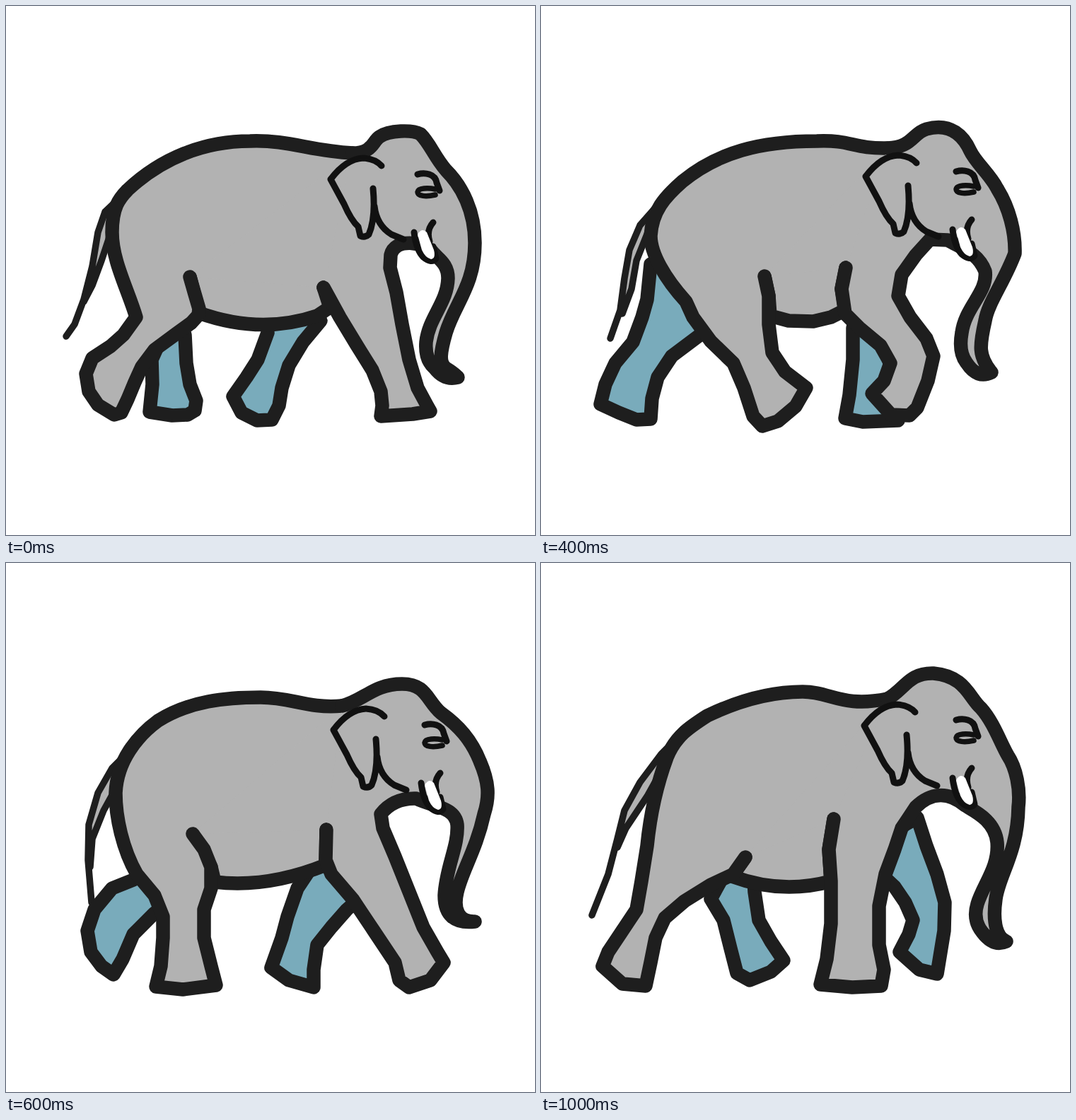
These frames come from a looping animation (748x748 px, 1200 ms). An HTML page without scripts:

```html
<!DOCTYPE html>
<html lang="en">
<head>
<meta charset="utf-8">
<title>Walking elephant</title>
<style>
  html, body { margin: 0; width: 100%; height: 100%; overflow: hidden; background: #fff; }
  svg { display: block; width: 100%; height: 100%; }
  path { stroke: #1e1e1e; stroke-width: 19.5; stroke-linecap: round; stroke-linejoin: round; fill: #b2b2b2; }
  .far { fill: #79abbb; }
  .tail { stroke-width: 9.5; }
  .core { stroke: none; }
  .line { fill: none; stroke: #111; stroke-width: 9; }
  .eye { stroke-width: 7.5; }
  .tusk { fill: #fff; stroke: none; }
  .pose { visibility: hidden; animation: show 1.2s step-end infinite; animation-delay: calc(var(--i) * 200ms - 1200ms); }
  @keyframes show {
    0% { visibility: visible; }
    16.6667%, 100% { visibility: hidden; }
  }
</style>
</head>
<body>
<svg viewBox="0 0 748 748">
  <defs>
    <path id="core" class="core" d="M200,300 320,208 490,206 520,300 470,400 430,420 280,425z"/>
    <path id="ear" class="line" d="M531,226Q522,216 505,215Q481,216 459,245L478,280Q488,303 498,312L501,325Q508,328 513,323Q523,300 519,258M521,283Q524,310 545,323L562,330"/>
    <g id="face">
      <path class="line" d="M582,238C592,235 607,237 609,250L613,261M604,306Q594,317 599,333"/>
      <path class="line eye" d="M607,267C594,270 582,269 582,263C583,257 597,257 607,259"/>
      <path class="line" d="M577,320Q580,345 590,355Q602,365 608,357L604,340"/>
      <path class="tusk" d="M582,323Q588,313 595,320L605,345Q608,357 601,358Q593,356 588,345z"/>
    </g>
  </defs>

  <g class="pose" style="--i:0">
    <path class="tail" d="M85,467 97,450 110,415 122,368 130,320 140,291 160,272 152,300 145,330 135,360 122,395 110,418"/>
    <path class="far" d="M253,465 255,505 260,535 269,558 267,572 257,578 235,579 203,574 207,535 206,500 215,480"/>
    <path class="far" d="M370,462 356,500 340,525 321,552 333,575 355,586 376,585 386,565 390,540 400,508 420,475 445,445"/>
    <use href="#core"/>
    <path d="M260,383 273,434Q360,465 440,438L458,426 449,398"/>
    <path d="M260,383 266,404 273,428 272,437 262,448 240,464 210,486 192,510 182,532 172,556 163,575 153,578 130,564 117,545 113,520 122,498 148,481 166,465 184,440C172,400 150,360 150,320C150,285 160,272 172,260C220,215 280,191 345,191C400,189 430,205 490,208"/>
    <path d="M490,208C518,208 518,192 528,185C542,175 575,175 586,181C600,195 605,212 622,232C645,255 663,290 663,335C663,395 635,420 622,462C614,490 612,505 622,512Q632,518 639,525Q620,530 606,512Q592,500 594,475C598,440 624,420 625,385C625,365 612,358 605,350C590,332 550,328 544,352L543,370 552,405 560,450 570,500 582,540 596,566 600,573 575,577 530,580 532,565 530,545 518,515 495,478 472,440 449,398"/>
    <use href="#ear"/>
    <use href="#face"/>
  </g>

  <g class="pose" style="--i:1">
    <path class="tail" d="M102,489 108,450 113,400 118,362 130,330 155,305 145,330 132,365 122,405 115,440"/>
    <path class="far" d="M157,310 152,360 153,415 153,455 145,500 141,540 137,568 160,577 195,576 199,550 196,510 205,475 222,448"/>
    <path class="far" d="M490,380 532,350 536,395 543,440 548,480 547,520 550,560 562,580 530,588 497,580 500,550 497,510 490,475 478,455"/>
    <use href="#core"/>
    <path d="M276,368 308,415 319,445 320,457 360,458 395,457 383,425 388,395 408,358"/>
    <path d="M276,368 290,390 308,415 319,445 312,480 303,520 296,560 294,580 270,585 245,577 220,560 226,540 232,510 240,470 238,455 215,435 190,405C165,375 157,340 157,310C160,285 170,275 180,262C225,208 290,185 365,184C410,186 430,199 490,199"/>
    <path d="M490,199C515,193 535,181 562,181C595,181 605,192 612,208C622,225 640,245 652,268C668,295 672,340 666,365C655,405 640,430 628,465C618,495 617,510 622,522L626,535Q603,530 603,490C605,455 628,420 629,392Q628,372 605,366C590,350 560,336 540,340L530,360 510,385 490,410 473,435 466,465 464,505 450,540 430,560 400,576 377,582 372,565 365,545 364,515 378,510 410,512 402,485 391,455 383,425 388,395 408,358"/>
    <use href="#ear" transform="translate(-52 -13) scale(1.1 1.05)"/>
    <use href="#face" transform="translate(6 4)"/>
  </g>

  <g class="pose" style="--i:2">
    <path class="tail" d="M98,470 112,430 118,385 125,345 140,310 162,285 155,310 135,360 128,400 115,435"/>
    <path class="far" d="M180,350 155,365 150,415 143,440 130,475 105,505 91,535 84,563 110,575 135,585 155,584 157,555 165,525 185,495 225,465 245,445"/>
    <path class="far" d="M465,440 441,455 441,500 436,550 430,583 455,588 505,586 492,500"/>
    <use href="#core"/>
    <path d="M316,382 322,410 324,438 350,445 385,446 410,440 430,430 425,400 431,370"/>
    <path d="M316,382 322,410 322,450 327,490 345,517 375,540 360,566 335,587 313,594 300,580 287,540 272,505 240,474 215,440 205,418C175,385 155,350 155,325C157,290 175,270 200,248C250,207 310,191 390,191C440,189 440,202 490,201"/>
    <path d="M490,201C525,200 525,180 545,174C580,164 598,185 607,205C615,222 635,238 645,258C662,285 671,320 670,350C655,390 632,420 628,445C620,480 618,495 637,518Q617,528 602,505Q590,490 595,462C600,425 632,405 628,375C618,350 600,345 575,331L550,330 530,352 510,380 505,410 522,440 545,470 555,495 547,530 532,568 521,579 495,578 468,548 485,530 494,505 480,480 450,455 430,435 425,400 431,370"/>
    <use href="#ear" transform="translate(0 -4)"/>
    <use href="#face" transform="translate(5 -4)"/>
  </g>

  <g class="pose" style="--i:3">
    <path class="tail" d="M121,480 116,420 117,370 130,325 150,290 178,262 160,310 138,350 122,390 119,430"/>
    <path class="far" d="M205,425 180,448 150,460 125,490 115,520 120,550 135,570 152,582 165,560 180,525 210,495 230,480"/>
    <path class="far" d="M470,425 432,430 412,460 398,500 390,530 375,572 400,590 435,600 435,575 440,540 460,515 482,490 505,470"/>
    <use href="#core"/>
    <path d="M264,383 290,430 295,451Q370,460 452,427L453,377"/>
    <path d="M264,383 280,405 290,430 290,460 280,490 280,530 290,570 297,597 250,603 212,599 219,570 222,530 222,500 210,470 185,440C165,405 155,360 155,325C157,280 185,245 215,223C260,195 310,190 360,190C405,190 425,206 475,202"/>
    <path d="M475,202C505,195 520,171 560,171C595,171 595,195 615,212C640,230 658,250 670,280C683,310 684,330 676,355C665,405 645,435 638,465C632,490 640,508 663,507Q620,512 620,470C622,430 640,400 638,370C635,345 605,345 580,333Q548,332 530,355L533,375 550,415 570,465 590,515 610,550 619,565 600,590 570,600 556,590 550,565 520,520 490,475 460,440 452,420 453,377"/>
    <use href="#ear" transform="translate(4 -9)"/>
    <use href="#face" transform="translate(10 -9)"/>
  </g>

  <g class="pose" style="--i:4">
    <path class="tail" d="M124,510 119,470 118,420 124,375 128,340 145,300 172,272 155,335 130,375 121,420"/>
    <path class="far" d="M254,450 256,500 251,550 275,572 310,580 312,545 315,510 325,480 330,460"/>
    <path class="far" d="M422,445 435,475 437,500 425,517 410,512 398,510 398,530 405,555 420,572 445,562 470,540 480,500 450,435"/>
    <use href="#core"/>
    <path d="M252,365 262,390 262,446 320,450 370,440 440,425 422,406"/>
    <path d="M252,365 262,390 264,425 255,450 238,475 225,505 217,530 215,565 215,593 180,598 140,596 146,570 158,535 172,505 180,480 178,430C165,395 165,340 168,300C172,265 190,240 215,222C255,196 300,187 340,187C400,185 430,197 490,202"/>
    <path d="M490,202C510,200 530,172 553,167C575,172 590,172 597,184C615,210 630,240 650,265C680,290 680,320 678,350C676,420 652,445 645,475C638,505 640,528 657,537Q635,545 622,530Q608,515 613,490C622,450 640,400 630,372C615,355 590,345 562,337Q530,345 530,370L530,410 532,440 537,490 540,530 545,575 550,593 510,596 476,595 477,565 478,520 478,495 470,465 450,435 422,406"/>
    <use href="#ear" transform="translate(1 -9)"/>
    <use href="#face" transform="translate(7 -9)"/>
  </g>

  <g class="pose" style="--i:5">
    <path class="tail" d="M72,498 95,440 108,390 118,350 140,310 170,270 205,235 175,285 150,330 120,375 108,402"/>
    <path class="far" d="M262,435 240,475 258,505 268,545 277,580 295,590 325,578 343,562 325,535 308,505 302,465 300,430"/>
    <path class="far" d="M480,390 532,360 545,400 560,440 571,480 570,520 560,581 535,575 507,550 520,525 526,505 515,480 500,458 470,430"/>
    <use href="#core"/>
    <path d="M289,416 270,443Q340,469 410,450L407,405 414,362"/>
    <path d="M289,416 272,440 240,455 203,478 175,502 162,530 155,565 148,598 115,595 87,570 95,550 115,520 135,490 142,450 150,400C155,350 165,310 178,275C190,245 210,232 235,216C285,192 330,182 370,182C410,182 425,205 490,192"/>
    <path d="M490,192C515,178 520,155 555,156C600,160 605,190 622,205C640,225 650,255 660,272C672,290 678,320 675,345C674,410 648,440 643,475C638,510 645,530 658,535Q640,543 624,522Q610,505 617,482C625,455 648,430 645,395C642,365 615,352 600,343C575,322 550,325 530,345L510,375 500,405 487,440 478,485 478,540 485,575 481,598 440,600 395,596 404,560 410,510 410,450 407,405 414,362"/>
    <use href="#ear" transform="translate(-2 -15)"/>
    <use href="#face" transform="translate(5 -16)"/>
  </g>
</svg>
</body>
</html>
```
